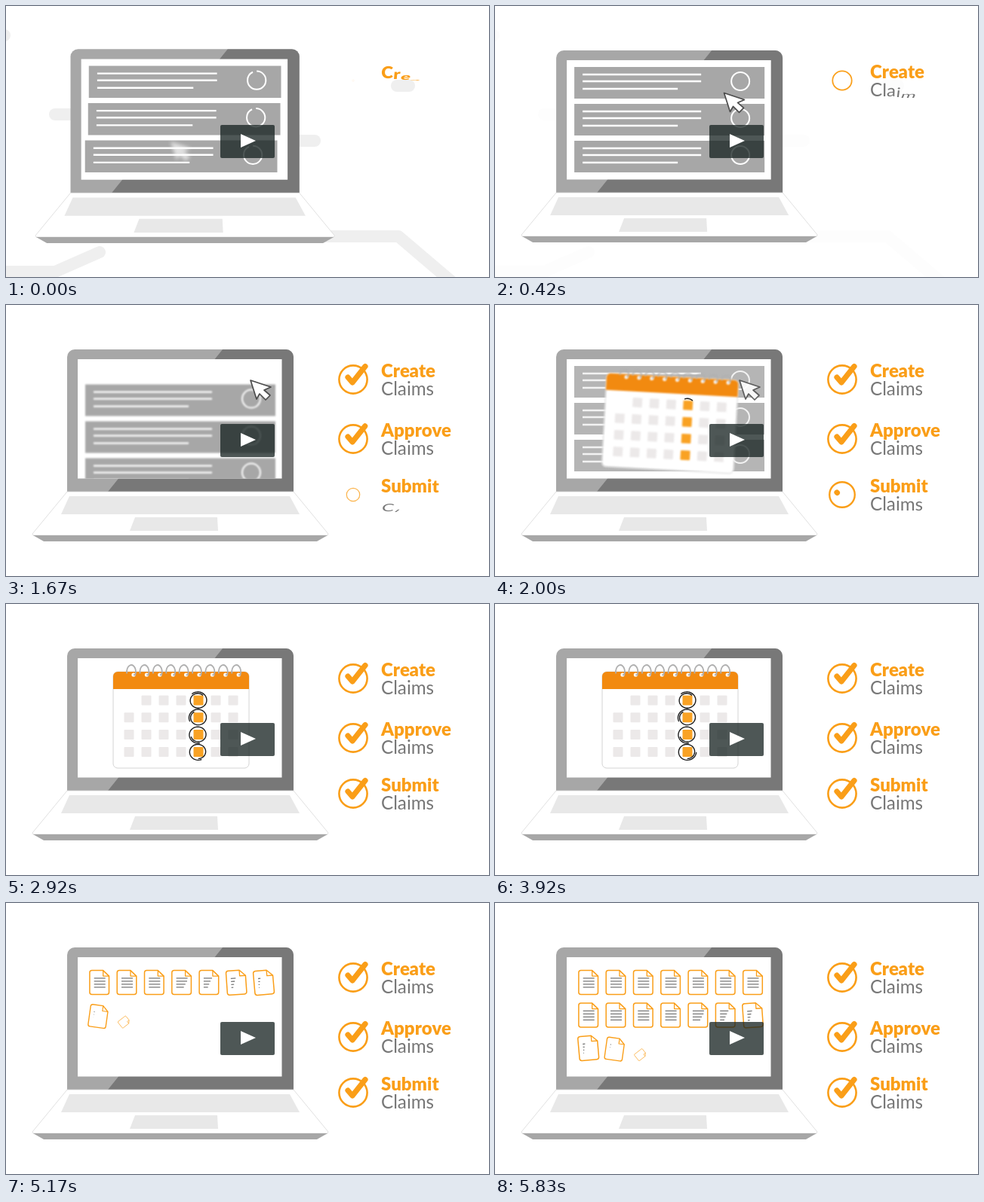
An HTML page with a canvas for the animation above (5.91 s loop, 640x360 px).

```html
<!DOCTYPE html>
<html lang="en">
<head>
<meta charset="utf-8">
<style>
  html, body { margin: 0; width: 100%; height: 100%; overflow: hidden; background: #fff; }
  canvas { display: block; }
</style>
</head>
<body>
<canvas id="stage" width="640" height="360"></canvas>
<script>
const ctx = document.getElementById('stage').getContext('2d');
const LOOP = 5910, STEP = 1000 / 12;
const ORANGE = '#fa9e18', BAND = '#f28a10', GRAY = '#a7a7a7', DARK = '#787878';

const clamp = v => Math.min(1, Math.max(0, v));
const ramp = (t, start, length) => clamp((t - start) / length);
const easeOut = u => 1 - (1 - u) ** 3;
const easeInOut = u => u * u * (3 - 2 * u);
const rad = deg => deg * Math.PI / 180;

function layer(draw) {
  ctx.save();
  draw();
  ctx.restore();
}

function trace(points, close) {
  ctx.beginPath();
  points.forEach(([x, y]) => ctx.lineTo(x, y));
  if (close) ctx.closePath();
}

function polygon(points, fill) {
  trace(points, true);
  ctx.fillStyle = fill;
  ctx.fill();
}

function stroke(color, width) {
  ctx.strokeStyle = color;
  ctx.lineWidth = width;
  ctx.stroke();
}

function line(points, color, width) {
  trace(points);
  stroke(color, width);
}

function box(x, y, w, h, fill, radius = 0) {
  ctx.beginPath();
  ctx.roundRect(x, y, w, h, radius);
  ctx.fillStyle = fill;
  ctx.fill();
}

// Two-segment tick, drawn on from its short end.
function tick(x, y, size, progress, color, width) {
  if (progress <= 0) return;
  const at = (px, py) => [x + px * size, y + py * size];
  const a = Math.min(1, progress / 0.3), b = ramp(progress, 0.3, 0.7);
  const points = [at(-7, -3), at(-7 + 6 * a, -3 + 7 * a)];
  if (b > 0) points.push(at(-1 + 17 * b, 4 - 21.5 * b));
  layer(() => {
    ctx.lineCap = ctx.lineJoin = 'round';
    line(points, color, width);
  });
}

function backdrop(t) {
  const alpha = 1 - ramp(t, 0, 500);
  if (!alpha) return;
  layer(() => {
    ctx.globalAlpha = alpha;
    ctx.lineCap = ctx.lineJoin = 'round';
    [
      [[-10, 39], [-2, 39]], [[65, 144], [95, 144]], [[380, 179], [409, 179]], [[518, 106], [534, 106]],
      [[-10, 353], [65, 353], [124, 327]], [[420, 306], [520, 306], [595, 370]]
    ].forEach(points => line(points, '#efefef', 16));
  });
}

function laptop() {
  box(81, 59, 300, 189, GRAY, [10, 10, 0, 0]);
  layer(() => {
    ctx.beginPath();
    ctx.roundRect(81, 59, 300, 189, [10, 10, 0, 0]);
    ctx.clip();
    polygon([[287, 59], [381, 59], [381, 248], [135, 248]], DARK);
  });
  box(95, 72, 270.5, 158.5, '#fff');
  polygon([[81, 248], [381, 248], [427, 304], [426, 306], [36, 306], [35, 304]], '#fff');
  stroke('#d9d9d9', 0.8);
  polygon([[36, 306], [426, 306], [412, 314], [50, 314]], GRAY);
  polygon([[84, 254], [376, 254], [389, 278], [73, 278]], '#e8e8e8');
  polygon([[171, 282], [280, 282], [281, 300], [164, 300]], '#e8e8e8');
}

function row(t, i) {
  const active = i === 0 && t < 1400 ? ramp(t, 640, 150) : 0;
  const pop = 1 + 0.016 * Math.sin(Math.PI * ramp(t, 640, 300)) * (i === 0);
  layer(() => {
    ctx.translate(231 - [0, 1, 5][i] * (1 - easeOut(ramp(t, 0, 350))), 102 + 49 * i);
    ctx.scale(pop, pop);
    box(-126, -21, 252, 42, GRAY);
    layer(() => {
      ctx.globalAlpha *= active;
      box(-126, -21, 252, 42, BAND);
    });
    [[-11, 157], [-2, 157], [8, 126]].forEach(([y, w]) => box(-115, y - 1.2, w, 2.4, '#fff'));
    ctx.beginPath();
    ctx.arc(94, -2, 12, rad(-90), rad(-90 + 360 * Math.min(1, 0.93 + t / 1200)));
    stroke('#fff', 2);
    if (active) tick(94, -2, 0.65, ramp(t, 700, 300), '#fff', 4);
  });
}

function rows(t) {
  if (t > 2140) return;
  const shift = 160 * (t < 1410 ? ramp(t, 1080, 330) ** 3 : (1 - ramp(t, 1410, 500)) ** 2.6);
  layer(() => {
    ctx.globalAlpha = 1 - 0.85 * ramp(t, 1960, 200);
    ctx.translate(0, shift);
    if (shift > 1) ctx.filter = 'blur(0.9px)';
    for (let i = 0; i < 3; i++) row(t, i);
  });
}

function cursor(t) {
  const alpha = Math.min(0.65 + t / 300, 1) * (1 - ramp(t, 1980, 180));
  if (!alpha) return;
  const move = easeInOut(ramp(t, 0, 580));
  const press = 1 - 0.15 * Math.sin(Math.PI * ramp(t, 580, 250));
  layer(() => {
    ctx.globalAlpha = alpha;
    ctx.translate(218 + 106 * move, 180 - 80 * move);
    ctx.scale(press, press);
    if (t < 250) ctx.filter = `blur(${2.5 - t / 100}px)`;
    ctx.lineJoin = 'round';
    polygon([[0, 0], [27, 9], [18, 13], [26, 20], [20, 26], [12, 18], [8, 25]], '#fff');
    if (t > 40) stroke('#4c4c4c', 1.7);
  });
}

// Hand-drawn loop, a little over one turn.
function loop(x, y, start, progress) {
  if (!progress) return;
  const points = [];
  for (let a = 0; a <= 440 * progress; a += 8) {
    const r = 9.6 + a / 170, angle = rad(start - a);
    points.push([x + r * Math.cos(angle), y + r * 0.94 * Math.sin(angle)]);
  }
  ctx.lineCap = 'round';
  line(points, '#1a1a1a', 1.4);
}

function calendar(t) {
  const inn = ramp(t, 1750, 350), out = Math.max(0, (t - 4100) / 400);
  if (!inn || out > 1.7) return;
  const slide = out ** 3, size = 1 - 0.1 * (1 - inn);
  layer(() => {
    ctx.translate(232 + 78 * slide, 154 + 140 * (1 - inn) ** 3 - slide);
    ctx.rotate(rad(11 * (1 - inn) + 14 * slide));
    ctx.scale(size, size);
    if (inn < 1 || out > 0.4) ctx.filter = 'blur(0.8px)';
    box(-90, -64, 180, 128, '#fff', 6);
    stroke('#d4d4d4', 1);
    box(-90, -64, 180, 23, BAND, [6, 6, 0, 0]);

    const rise = easeOut(ramp(t, 1920, 300));
    for (let i = 0; i < 9; i++) {
      const x = -66 + 17.4 * i;
      ctx.beginPath();
      ctx.arc(x + 3, -60, 2.6, 0, 7);
      ctx.fillStyle = '#fff';
      ctx.fill();
      if (!rise) continue;
      ctx.beginPath();
      ctx.ellipse(x, -64, 6, 9 * rise, 0, rad(165), rad(390));
      ctx.lineTo(x + 3, -60);
      stroke('#b0b0b0', 1.8);
    }

    for (let r = 0; r < 4; r++) {
      for (let c = r ? 0 : 1; c < 7; c++) {
        box(-75.5 + 23 * c, -32.5 + 22.8 * r, 13, 13, c === 4 ? '#f9a224' : '#ece9e9', 1);
      }
    }
    ctx.filter = 'none';
    for (let r = 0; r < 4; r++) {
      loop(22.5, -26 + 22.8 * r, -50 - 75 * r, ramp(t, 1930 + 200 * r, 450));
    }
  });
}

function documentIcon(i, age) {
  const scale = [0.42, 0.92, 1, 1][age] ?? 1;
  const tilt = [52, 8, -5, -4][age] ?? 0;
  const [dx, dy] = [[-3.5, 9], [-1.5, 1.5]][age] ?? [0, 0];
  layer(() => {
    ctx.translate(123.7 + 36.3 * (i % 7) + dx, 105.6 + 43.5 * Math.floor(i / 7) + dy);
    ctx.rotate(rad(tilt));
    ctx.scale(scale, scale);
    ctx.lineJoin = 'round';
    ctx.beginPath();
    ctx.moveTo(5, -16);
    ctx.arcTo(-12.8, -16, -12.8, 16, 3);
    ctx.arcTo(-12.8, 16, 12.8, 16, 3);
    ctx.arcTo(12.8, 16, 12.8, -8.5, 3);
    ctx.lineTo(12.8, -8.5);
    ctx.closePath();
    ctx.fillStyle = '#fff';
    ctx.fill();
    stroke(ORANGE, 1.5);
    line([[5, -16], [5, -8.5], [12.8, -8.5]], ORANGE, 1.3);
    for (let j = 0; j < 4; j++) {
      const length = 15 * clamp((age + 0.3 - 0.4 * j) / 5) ** 2;
      if (age) box(-7, -6.4 + 4 * j, length, 1.3, '#777');
    }
  });
}

function letters(text, font, color, y, time) {
  ctx.font = font;
  ctx.fillStyle = color;
  [...text].forEach((letter, i) => {
    const k = easeOut(ramp(time, 45 * i, 250));
    if (!k) return;
    layer(() => {
      ctx.translate(497 + ctx.measureText(text.slice(0, i)).width, y + 3 * (1 - k));
      ctx.transform(1, 0, -0.3 * (1 - k), k, 0, 0);
      ctx.fillText(letter, 0, 0);
    });
  });
}

function item(t, title, y, start) {
  const time = t - start;
  const grow = ramp(time, 50, 700) ** 0.85;
  if (grow) {
    ctx.beginPath();
    ctx.arc(460, y, 18.6 * grow, 0, 7);
    layer(() => {
      ctx.globalAlpha = Math.min(1, 0.3 + grow);
      stroke(ORANGE, 2.6 * grow);
    });
  }
  tick(460, y, 1, easeInOut(ramp(time, 630, 480)), ORANGE, 7.2);
  letters(title, '900 24px Lato, sans-serif', ORANGE, y - 3, time + 60);
  letters('Claims', '400 24.2px Lato, sans-serif', '#777', y + 21, time - 275);
}

function render(t, frame) {
  ctx.fillStyle = '#fff';
  ctx.fillRect(0, 0, 640, 360);
  backdrop(t);
  layer(() => {
    const near = 1 - easeOut(ramp(t, 0, 580));
    ctx.translate(3.6 * near, -2.4 * near);
    ctx.scale(1 + 0.011 * near, 1 + 0.011 * near);
    laptop();
    ctx.beginPath();
    ctx.rect(95, 72, 271, 158.5);
    ctx.clip();
    rows(t);
    calendar(t);
    for (let i = 0; i <= frame - 54; i++) documentIcon(i, frame - 54 - i);
  });
  cursor(t);
  item(t, 'Create', 99, -80);
  item(t, 'Approve', 178, 590);
  item(t, 'Submit', 252, 1330);
  box(284, 158, 72, 44, 'rgba(23,35,33,.76)', 2);
  polygon([[311, 170], [331, 179], [311, 188]], '#fff');
}

function play() {
  const frame = Math.min(70, Math.floor((performance.now() % LOOP + 5) / STEP));
  render(frame * STEP, frame);
  requestAnimationFrame(play);
}
play();
</script>
</body>
</html>
```
